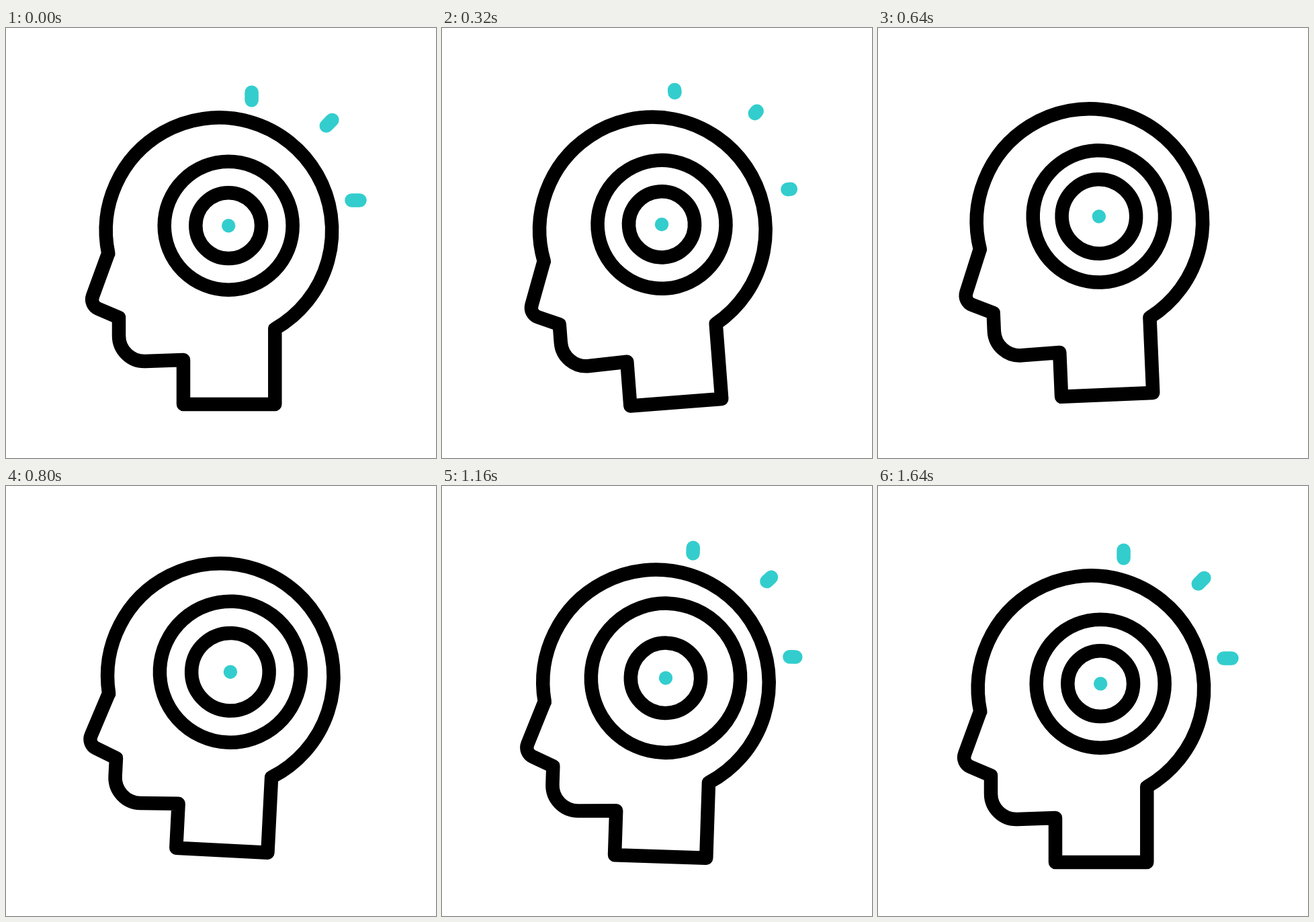
Write an HTML page with a canvas that moves like this. It is 640 px wide and 640 px high and loops after 1.72 s.

```html
<!DOCTYPE html>
<html lang="en">
<head>
<meta charset="utf-8">
<title>Focused mind</title>
<style>
  html, body { margin: 0; width: 100%; height: 100%; overflow: hidden; background: #fff; }
  canvas { display: block; width: 100vmin; height: 100vmin; }
</style>
</head>
<body>
<canvas id="stage" width="640" height="640"></canvas>
<script>
const ctx = document.getElementById('stage').getContext('2d');
const LOOP = 1720, STEP = 40, LAST = 1640;
const INK = '#000', TEAL = '#33cdcd';
const PIVOT = { x: 307, y: 348 };
const TARGET = { x: 331.2, y: 294.2 };

// Each ray runs from its inner end to its outer end.
const RAYS = [
  [365.6, 107.6, 365.6, 95.8],
  [476.8, 145.6, 485.4, 136.9],
  [514.5, 256.5, 526.5, 256.5]
];

const mix = (a, b, k) => a + (b - a) * k;
const clamp = v => Math.min(1, Math.max(0, v));

// Symmetric cubic-bezier(pull, 0, 1 - pull, 1).
function ease(u, pull = 1 / 3) {
  u = clamp(u);
  let lo = 0, hi = 1;
  for (let i = 0; i < 24; i++) {
    const s = (lo + hi) / 2, r = 1 - s;
    const x = 3 * pull * s * r * r + 3 * (1 - pull) * s * s * r + s * s * s;
    if (x < u) lo = s; else hi = s;
  }
  return lo * lo * (3 - 2 * lo);
}

// Keys are [time, value, pull of the segment that ends here].
function track(t, keys) {
  for (let i = 1; i < keys.length; i++) {
    const [t0, v0] = keys[i - 1], [t1, v1, pull] = keys[i];
    if (t <= t1) return mix(v0, v1, ease((t - t0) / (t1 - t0), pull));
  }
  return keys[keys.length - 1][1];
}

const tilt = t => track(t, [[0, 0], [430, -4.8, .6], [960, 4.05, .6], [1345, 0, .4]]);
const lift = t => track(t, [[250, 0], [960, -19.8, .68], [1345, 0, .4]]);
const pulse = t => track(t, [[280, 0], [840, 1], [1380, 0]]);

function drawHead() {
  ctx.beginPath();
  ctx.moveTo(152, 336);
  ctx.arcTo(124.2, 412.2, 168, 431, 15);
  ctx.lineTo(168, 431);
  ctx.arcTo(168, 497.4, 264, 494, 38);
  ctx.lineTo(264, 494);
  ctx.lineTo(264, 560);
  ctx.lineTo(400.3, 560);
  ctx.lineTo(400.3, 448);
  ctx.arc(317, 301.6, 168.2, Math.atan2(146.4, 83.3), Math.atan2(34.4, -165), true);
  ctx.closePath();
  ctx.stroke();
}

function circle(radius) {
  ctx.beginPath();
  ctx.arc(TARGET.x, TARGET.y, radius, 0, Math.PI * 2);
}

function drawRays(t) {
  const from = t < 700 ? ease(t / 545) : 0;
  const to = t < 700 ? 1 : ease((t - 880) / 420);
  if (to - from < .001) return;
  ctx.strokeStyle = TEAL;
  for (const [x0, y0, x1, y1] of RAYS) {
    ctx.beginPath();
    ctx.moveTo(mix(x0, x1, from), mix(y0, y1, from));
    ctx.lineTo(mix(x0, x1, to), mix(y0, y1, to));
    ctx.stroke();
  }
}

function draw(t) {
  ctx.setTransform(1, 0, 0, 1, 0, 0);
  ctx.fillStyle = '#fff';
  ctx.fillRect(0, 0, 640, 640);
  ctx.translate(PIVOT.x, PIVOT.y + lift(t));
  ctx.rotate(tilt(t) * Math.PI / 180);
  ctx.translate(-PIVOT.x, -PIVOT.y);

  ctx.lineWidth = 20.5;
  ctx.lineCap = ctx.lineJoin = 'round';
  ctx.strokeStyle = INK;
  drawHead();
  circle(48.9 + 9 * pulse(t));
  ctx.stroke();
  circle(95.5 + 17.2 * pulse(t - 220));
  ctx.stroke();

  ctx.fillStyle = TEAL;
  circle(10.2);
  ctx.fill();
  drawRays(t);
}

const start = performance.now();
function tick() {
  const t = (performance.now() - start) % LOOP;
  draw(Math.min(LAST, Math.floor(t / STEP) * STEP));
  requestAnimationFrame(tick);
}
tick();
</script>
</body>
</html>
```
